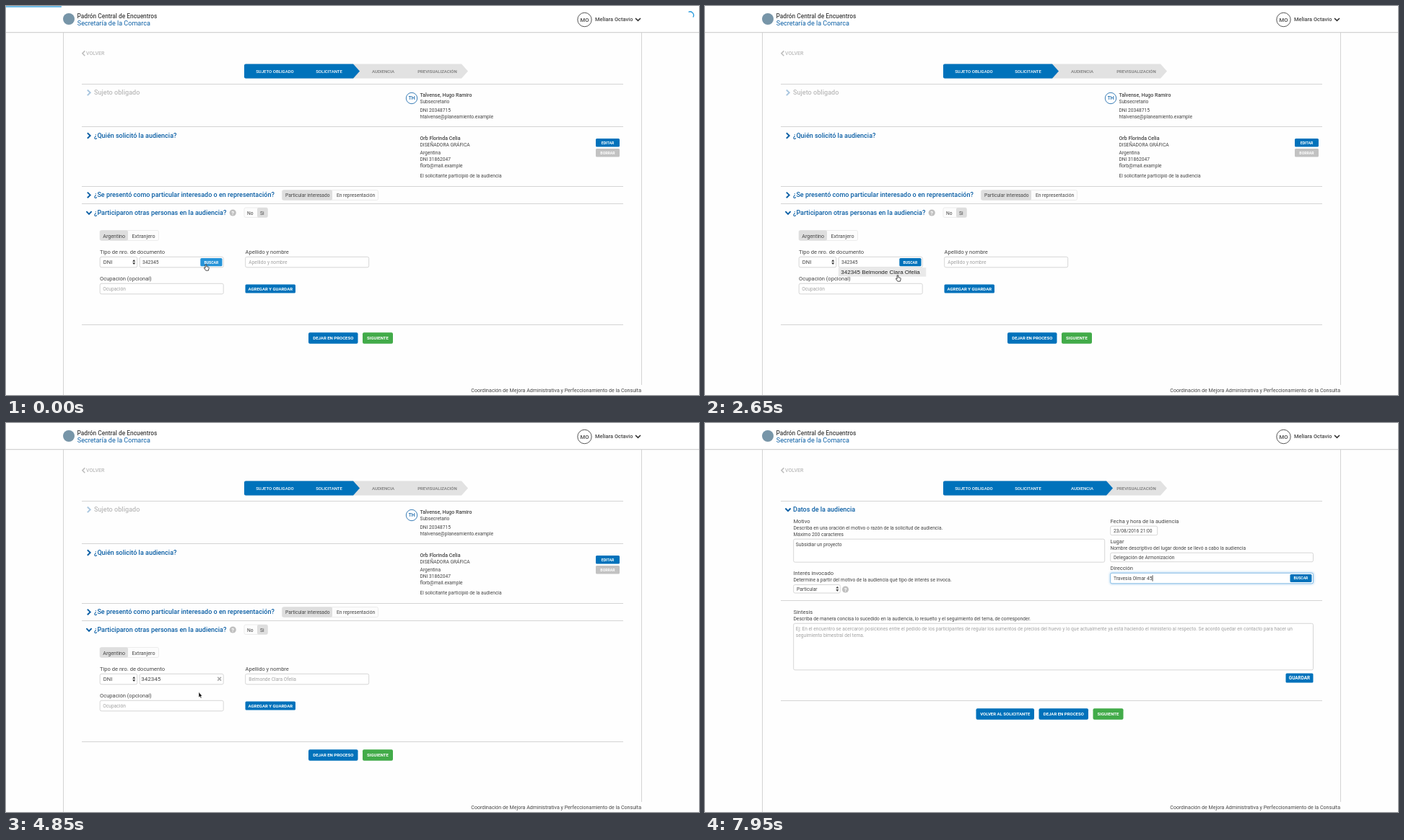
These frames come from a looping animation (960x540 px, 8000 ms). An HTML page:

```html
<!DOCTYPE html>
<html lang="es">
<head>
<meta charset="utf-8">
<title>Carga de audiencia</title>
<style>
html, body { margin: 0; width: 100%; height: 100%; overflow: hidden; background: #fefefe; }
svg { display: block; width: 960px; height: 540px; }
text { font: 400 6.65px Roboto, sans-serif; fill: #444; white-space: pre; }
.mid { text-anchor: middle; }
.h { font-size: 9px; font-weight: 500; fill: #0b5fa5; }
.off { fill: #bbb; }
.label { font-size: 7.55px; }
.name { font-size: 7px; font-weight: 500; }
.hint { fill: #a2a2a2; }
.btn { font-size: 6px; font-weight: 600; fill: #fff; text-anchor: middle; }
.tiny { font-size: 5.2px; }
.step { font-size: 6px; font-weight: 500; fill: #fff; text-anchor: middle; }
.next { fill: #777; }
.blue { fill: #0072bb; }
.green { fill: #42ab49; }
.grey { fill: #c2c2c2; }
.on { fill: #dedede; }
.box { fill: #fff; stroke: #ccc; stroke-width: .8; }
.toggle { fill: #fcfcfc; stroke: #e6e6e6; stroke-width: .7; }
.rule { stroke: #d4d4d4; fill: none; }
.chev { fill: none; stroke: #0b5fa5; stroke-width: 1.9; }

.timed, .timed-fill { animation: 8s step-end infinite; }
.first { animation-name: first; }
.second { animation-name: second; }
.search { animation-name: search; }
.picked { animation-name: picked; }
.list { animation-name: list; }
.item { animation-name: item; }
.find { animation-name: find; }
.hand { animation-name: hand; }
.beam { animation-name: beam; }
@keyframes first { 0% { opacity: 1 } 62.5%, 100% { opacity: 0 } }
@keyframes second { 0% { opacity: 0 } 62.5%, 100% { opacity: 1 } }
@keyframes search { 0% { opacity: 1 } 56.25%, 100% { opacity: 0 } }
@keyframes picked { 0% { opacity: 0 } 56.25%, 100% { opacity: 1 } }
@keyframes list { 0% { opacity: 0 } 4.4% { opacity: 1 } 56.25%, 100% { opacity: 0 } }
@keyframes item { 0% { fill: #fff } 12%, 100% { fill: #e9e9e9 } }
@keyframes find { 0% { fill: #2593d8 } 12%, 100% { fill: #0072bb } }
@keyframes hand { 0% { opacity: 1 } 9.5% { opacity: 0 } 12% { opacity: 1 } 56.25%, 100% { opacity: 0 } }
@keyframes beam { 0% { opacity: 0 } 9.5% { opacity: 1 } 12%, 100% { opacity: 0 } }

.pointer { animation: move 8s linear infinite; }
@keyframes move {
  0%, 8% { transform: translate(277px, 359px) }
  10.6% { transform: translate(273px, 361px) }
  14%, 100% { transform: translate(267px, 374px) }
}
.bar { transform-origin: 0 0; animation: load 8s infinite; }
@keyframes load {
  0% { transform: scaleX(.08); opacity: 1 }
  3.75% { transform: scaleX(.1); opacity: 1 }
  6.25% { transform: scaleX(1); opacity: 1 }
  8.75%, 100% { transform: scaleX(1); opacity: 0 }
}
.busy { animation: busy 8s linear infinite; }
@keyframes busy { 0%, 6.25% { opacity: 1 } 8.75%, 100% { opacity: 0 } }
.spin { transform-origin: 947.5px 13px; animation: spin .4s linear infinite; }
@keyframes spin { to { transform: rotate(360deg) } }
</style>
</head>
<body>
<svg viewBox="0 0 960 540">
  <defs>
    <path id="right" class="chev" d="M112.8-3.8l3.9 3.8-3.9 3.8"/>
    <path id="down" class="chev" d="M111.4-2l3.6 3.6 3.6-3.6"/>
    <path id="sort" fill="#333" d="M-2-.8L0-3.6 2-.8zM-2 .8L0 3.6 2 .8z"/>
    <g id="help"><circle r="4.6" fill="#c0c0c0"/><text class="mid" y="2.6" style="font-weight:700;font-size:7.5px;fill:#fff">?</text></g>
    <filter id="glow" x="-5%" y="-60%" width="110%" height="220%"><feGaussianBlur stdDeviation="1.5"/></filter>
  </defs>

  <!-- page shell -->
  <rect width="960" height="36" fill="#fff"/>
  <path class="rule" d="M0 36.5H960"/>
  <path d="M0 37.5H960" stroke="#f1f1f1"/>
  <path class="rule" d="M79.5 37V540M880.5 37V526"/>
  <circle cx="87" cy="18" r="8" fill="#7795a8"/>
  <text x="98.5" y="17" style="font-size:8.33px;font-weight:500">Padrón Central de Encuentros</text>
  <text x="98.8" y="27" style="font-size:9.05px;fill:#0b5fa5">Secretaría de la Comarca</text>
  <circle cx="801.5" cy="19" r="9.7" fill="#fff" stroke="#444" stroke-width=".9"/>
  <text class="mid" x="801.5" y="22" style="font-size:7.6px;font-weight:500">MO</text>
  <text x="816" y="21.2" style="font-size:7.5px;font-weight:500">Meliara Octavio</text>
  <path d="M872 17l3.5 3.4 3.5-3.4" fill="none" stroke="#333" stroke-width="1.6"/>
  <path d="M109.3 62.4l-3.4 3.4 3.4 3.4" fill="none" stroke="#bbb" stroke-width="1.5"/>
  <text class="off" x="111" y="68.4" style="font-size:7px;font-weight:500">VOLVER</text>
  <text x="880" y="536" text-anchor="end" style="font-size:7.1px">Coordinación de Mejora Administrativa y Perfeccionamiento de la Consulta</text>
  <path d="M332 80.5H631L640 90.5 631 100.5H332z" fill="#e2e2e2"/>
  <path class="rule" d="M105 108.5H855"/>
  <text class="step next" x="597.5" y="93">PREVISUALIZACIÓN</text>

  <!-- applicant form -->
  <g class="timed first">
    <path class="blue" d="M332 80.5H481L490 90.5 481 100.5H332Q330 100.5 330 98.5V82.5Q330 80.5 332 80.5z"/>
    <text class="step next" x="522.5" y="93">AUDIENCIA</text>
    <path class="rule" d="M105 167.5H855M105 250.5H855M105 274.5H855M105 442.5H855"/>

    <use href="#right" y="120.3" style="opacity:.35"/>
    <text class="h off" x="122" y="123.2" style="font-size:9.1px">Sujeto obligado</text>
    <circle cx="562" cy="128" r="7.7" fill="#fff" stroke="#0b5fa5" stroke-width=".8"/>
    <text class="mid" x="562" y="130.4" style="font-size:6.5px;font-weight:500;fill:#0b5fa5">TH</text>
    <text class="name" x="573.5" y="126">Talvense, Hugo Ramiro</text>
    <text x="573.5" y="135">Subsecretario</text>
    <text x="573.5" y="146.6">DNI 20348715</text>
    <text x="573.5" y="155.7">htalvense@planeamiento.example</text>

    <use href="#right" y="180"/>
    <text class="h" x="122" y="182.6">¿Quién solicitó la audiencia?</text>
    <text class="name" x="573.5" y="185.5">Orb Florinda Celia</text>
    <text x="573.5" y="194.6">DISEÑADORA GRÁFICA</text>
    <text x="573.5" y="206">Argentina</text>
    <text x="573.5" y="215">DNI 31862047</text>
    <text x="573.5" y="224.2">florb@mail.example</text>
    <text x="573.5" y="238">El solicitante participió de la audiencia</text>
    <rect class="blue" x="817" y="184" width="33" height="11.5" rx="1.5"/>
    <text class="btn tiny" x="833.5" y="191.8">EDITAR</text>
    <rect class="grey" x="817" y="198" width="33" height="11.5" rx="1.5"/>
    <text class="btn tiny" x="833.5" y="205.8">BORRAR</text>

    <use href="#right" y="262.4"/>
    <text class="h" x="122" y="265.2">¿Se presentó como particular interesado o en representación?</text>
    <rect class="toggle" x="382.5" y="255.5" width="133" height="14" rx="2"/>
    <rect class="on" x="382.5" y="255.5" width="69.5" height="14" rx="2"/>
    <text x="387" y="265">Particular interesado</text>
    <text x="458" y="265">En representación</text>

    <use href="#down" y="287.2"/>
    <text class="h" x="122" y="289.8">¿Participaron otras personas en la audiencia?</text>
    <use href="#help" x="314.2" y="287"/>
    <rect class="toggle" x="330" y="280" width="32.5" height="13.5" rx="2"/>
    <rect class="on" x="348" y="280" width="14.5" height="13.5" rx="2"/>
    <text x="334" y="289.5">No</text>
    <text x="352" y="289.5">Si</text>

    <rect class="toggle" x="130" y="311.5" width="81.5" height="14" rx="2"/>
    <rect class="on" x="130" y="311.5" width="39" height="14" rx="2"/>
    <text x="134.3" y="321.5" style="font-size:7.15px">Argentino</text>
    <text x="174.5" y="321.5" style="font-size:7.15px">Extranjero</text>

    <text class="label" x="130" y="344.2">Tipo de nro. de documento</text>
    <rect class="box" x="130.2" y="348.3" width="51.5" height="14.5" rx="2"/>
    <text x="134.8" y="358.3" style="font-size:7.6px">DNI</text>
    <use href="#sort" x="177.2" y="355.5"/>
    <rect class="box" x="185.2" y="348.3" width="116" height="14.5" rx="2"/>
    <text class="label" x="331.5" y="344.2">Apellido y nombre</text>
    <rect class="box" x="331.7" y="348.3" width="171" height="14.5" rx="2"/>
    <text class="label" x="130" y="381.2">Ocupación (opcional)</text>
    <rect class="box" x="130.2" y="385.3" width="171" height="14.5" rx="2"/>
    <text class="hint" x="134.3" y="395">Ocupación</text>
    <rect class="blue" x="331.5" y="386.5" width="69.5" height="12" rx="1.5"/>
    <text class="btn" x="366.3" y="394.8">AGREGAR Y GUARDAR</text>

    <g class="timed search">
      <text x="189" y="358">342345</text>
      <rect class="timed-fill find" x="269.3" y="350" width="30.2" height="11.3" rx="1.5"/>
      <text class="btn tiny" x="284.4" y="357.5" style="font-size:5.1px">BUSCAR</text>
      <text class="hint" x="336.3" y="358">Apellido y nombre</text>
    </g>
    <g class="timed list">
      <rect class="timed-fill item" x="185" y="363.2" width="121" height="12.4" stroke="#eee" stroke-width=".6"/>
      <text x="188.3" y="372.1" style="font:8px 'Liberation Sans',sans-serif;fill:#222">342345 Belmonde Clara Ofelia</text>
    </g>
    <g class="timed picked">
      <text x="187.3" y="358.2" style="font-size:8px">342345</text>
      <path d="M293.2 352.8l4.8 4.8m0-4.8l-4.8 4.8" stroke="#aaa" stroke-width="1.6"/>
      <text class="hint" x="336.3" y="358">Belmonde Clara Ofelia</text>
    </g>

    <rect class="blue" x="419" y="453.3" width="68.5" height="15.5" rx="2"/>
    <text class="btn" x="453.3" y="463.3">DEJAR EN PROCESO</text>
    <rect class="green" x="494" y="453.3" width="42" height="15.5" rx="2"/>
    <text class="btn" x="515" y="463.3">SIGUIENTE</text>

    <g class="pointer">
      <path class="timed hand" d="M-.9 0Q0-.9 .8 0V2.8L3.6 3.4Q4.4 3.7 4.2 4.7L3.4 8.2H-.2L-2.5 4.9Q-2.6 3.9-1.7 4.1L-.9 4.8z" fill="#fff" stroke="#222" stroke-width=".8"/>
      <path class="timed beam" d="M-1 -1H1M0-1V7.4M-1 7.4H1" fill="none" stroke="#222" stroke-width=".7"/>
      <path class="timed picked" d="M0-.5V7L1.6 5.5 2.8 8.1 4 7.5 2.9 5.1H4.8z" fill="#111" stroke="#fff" stroke-width=".5"/>
    </g>
  </g>

  <!-- meeting form -->
  <g class="timed second">
    <path class="blue" d="M332 80.5H556L565 90.5 556 100.5H332Q330 100.5 330 98.5V82.5Q330 80.5 332 80.5z"/>
    <text class="step" x="522.5" y="93">AUDIENCIA</text>
    <path class="rule" d="M105 246.5H855M105 385.5H855"/>
    <use href="#down" y="120.5"/>
    <text class="h" x="122" y="123.1">Datos de la audiencia</text>

    <text class="label" x="122.5" y="138.6">Motivo</text>
    <text x="122.5" y="147.7">Describa en una oración el motivo o razón de la solicitud de audiencia.</text>
    <text x="122.5" y="156.7">Máximo 200 caracteres</text>
    <rect class="box" x="122.7" y="161.2" width="431" height="32" rx="2"/>
    <text x="125.8" y="171">Subsidiar un proyecto</text>

    <text class="label" x="122.5" y="211.2">Interés invocado</text>
    <text x="122.5" y="220.3">Determine a partir del motivo de la audiencia qué tipo de interés se invoca.</text>
    <rect class="box" x="122.7" y="224.5" width="64.6" height="11.5" rx="2"/>
    <text x="127" y="232.6">Particular</text>
    <use href="#sort" x="183.3" y="230.3" style="opacity:.9"/>
    <use href="#help" x="194.5" y="231"/>

    <text class="label" x="561.5" y="138.6">Fecha y hora de la audiencia</text>
    <rect class="box" x="561.7" y="143.2" width="65" height="12.5" rx="2"/>
    <text x="566" y="152">23/08/2016 21:00</text>
    <text class="label" x="561.5" y="166.6">Lugar</text>
    <text x="561.5" y="175.7">Nombre descriptivo del lugar donde se llevó a cabo la audiencia</text>
    <rect class="box" x="561.7" y="180.2" width="280.8" height="12.5" rx="2"/>
    <text x="566" y="189">Delegación de Armonización</text>
    <text class="label" x="561.5" y="203.6">Dirección</text>
    <rect x="561.7" y="208.3" width="280.8" height="14.5" rx="2" fill="none" stroke="#66afe9" stroke-width="2" opacity=".6" filter="url(#glow)"/>
    <rect x="561.7" y="208.3" width="280.8" height="14.5" rx="2" fill="#fff" stroke="#72b1e0" stroke-width=".8"/>
    <text id="address" x="566" y="218"></text>
    <rect id="caret" y="211.3" width=".8" height="8.4" fill="#222"/>
    <rect class="blue" x="810.5" y="210" width="30" height="11" rx="1.5"/>
    <text class="btn tiny" x="825.5" y="217.4" style="font-size:5.1px">BUSCAR</text>

    <text class="label" x="122.5" y="264.6">Síntesis</text>
    <text x="122.5" y="273.7">Describa de manera concisa lo sucedido en la audiencia, lo resuelto y el seguimiento del tema, de corresponder.</text>
    <rect class="box" x="122.7" y="278.3" width="719.8" height="64.5" rx="2"/>
    <text class="hint" x="125.8" y="288">Ej: En el encuentro se acercaron posiciones entre el pedido de los participantes de regular los aumentos de precios del huevo y lo que actualmente ya está haciendo el ministerio al respecto. Se acordó quedar en contacto para hacer un</text>
    <text class="hint" x="125.8" y="297.1">seguimiento bimestral del tema.</text>
    <rect class="blue" x="804.5" y="347.5" width="38" height="13" rx="1.5"/>
    <text class="btn" x="823.5" y="356.3" style="font-size:6.4px">GUARDAR</text>

    <rect class="blue" x="375.5" y="396.3" width="80.5" height="15.5" rx="2"/>
    <text class="btn" x="415.8" y="406.3">VOLVER AL SOLICITANTE</text>
    <rect class="blue" x="462.5" y="396.3" width="68.5" height="15.5" rx="2"/>
    <text class="btn" x="496.8" y="406.3">DEJAR EN PROCESO</text>
    <rect class="green" x="537.5" y="396.3" width="42" height="15.5" rx="2"/>
    <text class="btn" x="558.5" y="406.3">SIGUIENTE</text>
  </g>

  <text class="step" x="372.5" y="93">SUJETO OBLIGADO</text>
  <text class="step" x="447.5" y="93">SOLICITANTE</text>

  <rect class="bar" width="960" height="1.3" fill="#2299dd"/>
  <g class="busy"><path class="spin" d="M945.5 8.3A5 5 0 0 1 951.8 15.5" fill="none" stroke="#2299dd" stroke-width="1.3"/></g>
</svg>
<script>
const LOOP = 8000;
const ADDRESS = "Travesía Olmar 45";
const TYPED_BEFORE = 6;
const KEY_TIMES = [5050, 5150, 5250, 5350, 5450, 5800, 6100, 6400, 6700, 7400, 7700];
const address = document.getElementById("address");
const caret = document.getElementById("caret");
const start = performance.now();

function draw() {
  const time = (performance.now() - start) % LOOP;
  const count = TYPED_BEFORE + KEY_TIMES.filter(key => key <= time).length;
  address.textContent = ADDRESS.slice(0, count);
  caret.setAttribute("x", 566.2 + address.getComputedTextLength());
  requestAnimationFrame(draw);
}
draw();
</script>
</body>
</html>
```
